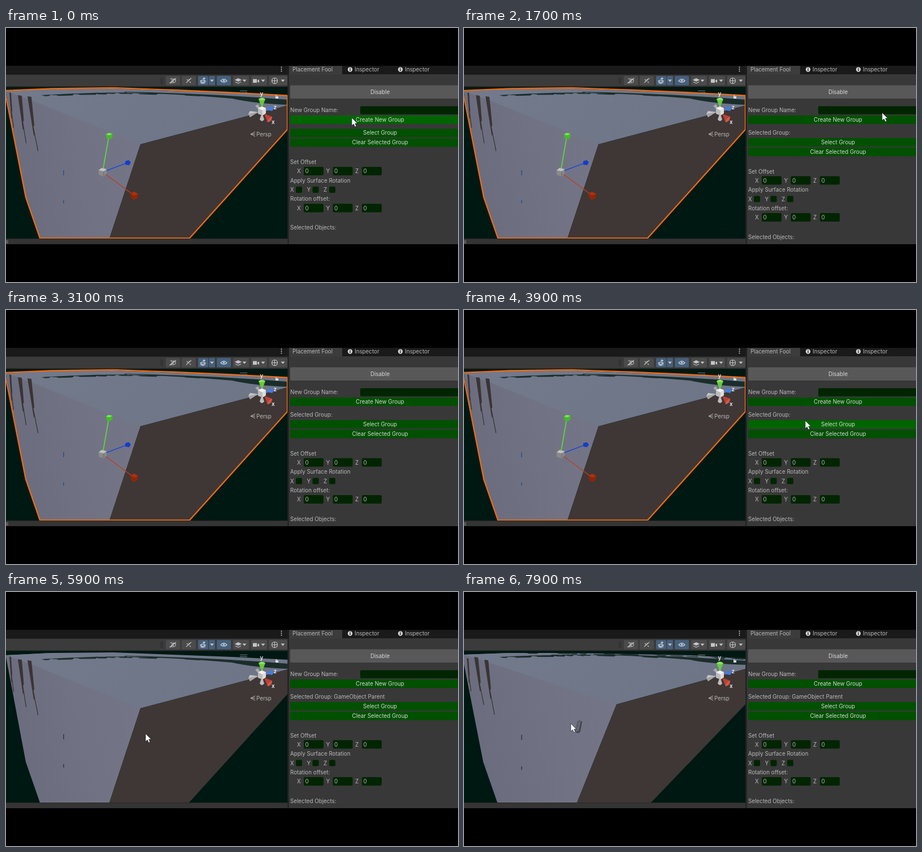
Write an HTML page that moves like this. It is 800 by 450 pixels and loops after 8 s.

```html
<!DOCTYPE html>
<html lang="en">
<head>
<meta charset="utf-8">
<title>Placement editor</title>
<style>
  html, body { margin: 0; width: 100%; height: 100%; overflow: hidden; background: #000; }
  svg { display: block; width: 800px; height: 450px; }
  text { font: 9.8px Inter, Roboto, sans-serif; fill: #b8b8b8; }
  .mid { text-anchor: middle; fill: #d8d8d8; }
  .btn { fill: #005000; }
  .btn.hot { fill: #006400; }
  .field { fill: #002500; }
  .axis { font-weight: 600; fill: #eee; }
  .icon { fill: none; stroke: #c4c4c4; stroke-width: 1.1; }
  .fill { fill: #c4c4c4; }
</style>
</head>
<body>
<svg viewBox="0 0 800 450">
  <defs>
    <clipPath id="view"><rect y="104" width="498.5" height="269"/></clipPath>
    <clipPath id="app"><rect y="67" width="800" height="316"/></clipPath>
    <linearGradient id="side" x1="0" y1=".25" x2="1" y2="0">
      <stop offset="0" stop-color="#6b6d7e"/><stop offset=".5" stop-color="#717384"/><stop offset="1" stop-color="#747688"/>
    </linearGradient>
    <linearGradient id="roof" x1="0" y1="0" x2="1" y2=".2">
      <stop offset="0" stop-color="#737a8c"/><stop offset="1" stop-color="#6d7587"/>
    </linearGradient>
  </defs>
  <rect width="800" height="450"/>
  <g clip-path="url(#app)">
    <rect y="67" width="800" height="316" fill="#383838"/>

    <!-- scene -->
    <g clip-path="url(#view)">
      <rect y="104" width="499" height="270" fill="#001812"/>
      <path id="left" fill="url(#side)"/>
      <path id="top" fill="url(#roof)"/>
      <path id="dark" fill="#3e3736"/>
      <path id="streaks" fill="#1b2d2a"/>
      <path id="slits" fill="#3a3434"/>
      <path id="marks" fill="none" stroke-width="2"/>
      <g id="capsule">
        <path d="M-3 8 1-7" stroke="#565865" stroke-width="7" stroke-linecap="round"/>
        <path d="M-3 7 2-7" stroke="#646673" stroke-width="4" stroke-linecap="round"/>
        <path d="M-4 10Q0 12 2 8L5-9" fill="none" stroke="#3c3d48" stroke-width="2"/>
      </g>
      <g id="selection">
        <path d="M-2 111 80 107.500 190 106 300 110 400 114.500 498 119.500V180L325 372.300H60L35 300-2 112" fill="none" stroke="#ee6a12" stroke-width="2.300"/>
        <path d="M172 249 182 192" stroke="#62d63a" stroke-width="1.700"/>
        <path d="M177 253 214 239" stroke="#2148d8" stroke-width="1.500"/>
        <path d="M176 259 226 296" stroke="#c23c22" stroke-width="1.500"/>
        <path d="M177 189 181 186 188 187 189 192 185 197 178 196Z" fill="#46b82c"/>
        <path d="M177 189 181 186 188 187 184 190Z" fill="#7aeb58"/>
        <path d="M211 236 217 234 221 238 218 243 211 242Z" fill="#183cc8"/>
        <path d="M220 293 227 290 234 294 233 302 226 305 221 300Z" fill="#8c260a"/>
        <path d="M220 293 227 290 234 294 227 297Z" fill="#a8330f"/>
        <path d="M164 252 169 248 178 250 178 258 173 263 164 260Z" fill="#898989"/>
        <path d="M164 252 169 248 178 250 173 254Z" fill="#c2c2c2"/>
        <path d="M173 254V262" stroke="#666"/>
      </g>

      <!-- orientation widget -->
      <path d="M414 111.500H427M414 114.500H427" stroke="#777b82"/>
      <path d="M441 138 446 135 450 142 447 144Z" fill="#aaa"/>
      <path d="M429 152 432 147 446 149 432 158Z" fill="#c6c6c6"/>
      <path d="M429 152 432 158 446 149Z" fill="#a4a4a4"/>
      <path d="M453 150 457 162Q453 168 449 162Z" fill="#bdbdbd"/>
      <path d="M447 126Q453 121 459 126L454 139H452Z" fill="#68c83c"/>
      <path d="M447 126Q453 121 459 126 453 130 447 126" fill="#8be45e"/>
      <path d="M460 145 470 138Q476 142 471 147Z" fill="#447be0"/>
      <path d="M457 152 471 157Q471 165 463 167Z" fill="#bd4034"/>
      <path d="M471 157Q471 165 463 167 463 160 471 157" fill="#d65748"/>
      <path d="M446 142 453 139 460 142V151L454 155 446 152Z" fill="#bcbcbc"/>
      <path d="M446 142 453 139 460 142 454 146Z" fill="#f1f1f1"/>
      <path d="M454 146 460 142V151L454 155Z" fill="#ddd"/>
      <text class="axis" x="449.500" y="120">y</text>
      <text class="axis" x="473.500" y="143.500">z</text>
      <text class="axis" x="470" y="170">x</text>
      <rect x="477" y="121" width="5" height="4" fill="#ddd"/>
      <path d="M477.500 121V119.500H480" fill="none" stroke="#ccc"/>
      <path d="M441 184 433 188 441 192M433 188H441" fill="none" stroke="#bbb"/>
      <text x="443" y="191.500">Persp</text>
    </g>

    <!-- toolbar -->
    <rect y="67" width="499" height="15.500" fill="#1a1a1a"/>
    <rect y="82.500" width="499" height="21.500" fill="#3b3b3b"/>
    <path d="M0 82.500H499M0 104H499" stroke="#222"/>
    <g fill="#d0d0d0"><circle cx="487.500" cy="69.500" r="1"/><circle cx="487.500" cy="73" r="1"/><circle cx="487.500" cy="76.500" r="1"/></g>
    <path d="M274.500 88V99M277 88V99" stroke="#292929"/>
    <g id="tools"></g>
    <g class="icon">
      <path d="M290.500 90H294Q295 94 290.500 97H295M296 90V97Q301 97 300 92 299 90 296 90M290 98 301 89"/>
      <path d="M319 97 328 89M320 91 323 94M325 95 327 97M324 90V92"/>
      <path d="M344 94 348 92 353 94 348 96.500ZM344 96.500 348 98.500 353 96.500M350.500 87.500V92M348 89.500H353" stroke="#e0e0e0"/>
      <path d="M380 93.500Q385.500 87.500 391 93.500 385.500 99 380 93.500Z" stroke="#dce4ec"/>
      <path d="M406 92 411 89.500 416 92 411 94.500ZM406 95.500 411 98 416 95.500"/>
      <circle cx="475.500" cy="93.500" r="5"/><path d="M470.500 93.500H480.500M475.500 88.500V98.500"/>
    </g>
    <g class="fill">
      <circle cx="385.500" cy="93.300" r="1.800"/>
      <path d="M406 92 411 89.500 416 92 411 94.500ZM437 90.500H444V97H437ZM445 93 448 91V97L445 95Z"/>
      <path id="carets"/>
    </g>
    <rect y="373" width="499" height="10" fill="#343434"/>
    <path d="M0 373.500H499" stroke="#292929"/>
    <rect id="scroll" y="376" width="4" height="6" fill="#555"/>
    <rect x="498.500" y="67" width="2" height="316" fill="#202020"/>

    <!-- panel -->
    <rect x="500" y="67" width="300" height="15" fill="#1a1a1a"/>
    <rect x="501" y="67" width="94" height="15.500" fill="#3c3c3c"/>
    <text x="507" y="77">Placement Fool</text>
    <g id="tabs"></g>
    <rect x="503" y="101.500" width="318" height="23.500" rx="2" fill="#585858"/>
    <text class="mid" x="662" y="116.600">Disable</text>
    <text x="503" y="149">New Group Name:</text>
    <rect class="field" x="627" y="138.500" width="190" height="14.500" rx="2"/>
    <rect class="btn" x="503" y="155" width="318" height="15" rx="2"/>
    <text class="mid" x="662" y="166">Create New Group</text>
    <text id="group" x="503" y="188.700"></text>
    <g id="form">
      <rect class="btn" x="503" y="195" width="318" height="15" rx="2"/>
      <text class="mid" x="662" y="205.700">Select Group</text>
      <rect class="btn" x="503" y="212" width="318" height="15" rx="2"/>
      <text class="mid" x="662" y="222.700">Clear Selected Group</text>
      <text x="503" y="257.500">Set Offset</text>
      <text x="503" y="290.200">Apply Surface Rotation</text>
      <text x="503" y="322.800">Rotation offset:</text>
      <text x="503" y="373.500">Selected Objects:</text>
      <g id="inputs"></g>
    </g>
    <path id="cursor" d="M0 0V14L3.300 11 5.500 16 8 15 5.800 10H10Z" fill="#fff" stroke="#222" stroke-width=".7"/>
  </g>
</svg>
<script>
const LOOP = 8000, STEP = 100;
const $ = id => document.getElementById(id);
const set = (id, name, value) => $(id).setAttribute(name, value);
const show = (id, on) => { $(id).style.display = on ? '' : 'none'; };
const mix = (a, b, k) => a + (b - a) * k;

// cursor path: time, x, y
const path = [
  [0, 612, 159], [500, 622, 161], [900, 634, 161], [1300, 650, 164], [1700, 740, 150],
  [1900, 830, 130], [3300, 830, 250], [3600, 680, 215], [3900, 604, 196], [4300, 606, 199],
  [4600, 700, 250], [4800, 830, 300], [5200, 830, 290], [5500, 650, 275], [5900, 247, 251],
  [6300, 205, 268], [6800, 174, 241], [7300, 178, 237], [7900, 189, 233], [8000, 189, 233]
];
const SHIFT = 500, PICK = 4200, DESELECT = 5200, PLACE = 6800, ORBIT = 7300;

function buildStatic() {
  $('tools').innerHTML = [[283, 25], [311, 25], [340, 18, 1], [359, 11, 1], [373, 25, 1], [402, 28], [434, 28], [466, 32]]
    .map(([x, w, on]) => `<rect x="${x}" y="85" width="${w}" height="16.500" rx="1.500" fill="${on ? '#46607c' : '#4b4b4b'}"/>`).join('');
  set('carets', 'd', [364.5, 422, 455, 490].map(x => `M${x - 3.5} 91.500h7l-3.500 4z`).join(''));
  $('tabs').innerHTML = [609, 698].map(x =>
    `<circle cx="${x}" cy="73.500" r="4.200" fill="#d0d0d0"/><path d="M${x} 72.700v3.300M${x} 70.700v1.200" stroke="#1a1a1a" stroke-width="1.400"/><text x="${x + 8}" y="77">Inspector</text>`).join('');
  const row = y => [526, 577.5, 629].map((x, i) =>
    `<text x="${x - 11}" y="${y + 11.3}">${'XYZ'[i]}</text><rect class="field" x="${x + 1}" y="${y}" width="35" height="15" rx="2"/><text x="${x + 3.5}" y="${y + 11.3}">0</text>`).join('');
  const checks = [503, 532.5, 562].map((x, i) =>
    `<text x="${x}" y="306.500">${'XYZ'[i]}</text><rect class="field" x="${x + 10}" y="297.500" width="11" height="11" rx="2"/>`).join('');
  $('inputs').innerHTML = row(262.5) + checks + row(328);
}

function seeded(seed) {
  return () => (seed = seed * 16807 % 2147483647) / 2147483647;
}

// overlapping torn flakes along a bowed line
function flakes(seed, x0, y0, x1, y1, bow, thick, gap) {
  const rnd = seeded(seed);
  const at = x => {
    const u = (x - x0) / (x1 - x0);
    return mix(y0, y1, u) + bow * 4 * u * (1 - u);
  };
  let d = '';
  for (let x = x0; x < x1;) {
    const w = 14 + rnd() * 28, h = thick * (.5 + rnd() * .6), end = Math.min(x1, x + w * 1.25);
    if (rnd() > gap) d += `M${x} ${at(x)}L${end} ${at(end)}l-4 ${h}L${x + w * .45} ${at(x + w * .45) + h * .8}l-2 -1Z`;
    x += w;
  }
  return d;
}

// tapering gap with ragged lower end
function slit(x, y, dx, h, w) {
  return `M${x} ${y}l${w} 1 ${dx * .3} ${h * .5} ${-w * .2} 2 ${dx * .5} ${h * .42} -1 2 ${-dx * .35} ${-h * .3} -1 3Z`;
}

function drawScene(k, selected) {
  const p = (a, b) => mix(a, b, k);
  const cx = p(238, 270), cy = p(206, 199);
  const foot = p(183, 200), end = p(324, 331), edge = p(180, 198);
  set('left', 'd', `M0 ${p(112, 111)}L80 108 150 112 ${cx} ${cy} ${foot} 373H${p(60, 59)}L${p(35, 34)} 301 0 ${p(115, 128)}Z`);
  set('top', 'd', `M0 ${p(112, 111)}L80 108 190 ${p(107, 108)} 400 ${p(115, 112)} 499 ${p(120, 118)}V${p(137, 136)}L${cx} ${cy} ${p(40, 38)} ${p(126, 123)}Z`);
  set('dark', 'd', `M${cx} ${cy}L499 ${p(137, 136)}V${edge}L${end} 373H${foot}Z`);
  const wedge = `M${p(210, 230)} ${p(113, 110)}Q${p(360, 370)} ${p(116, 112)} 499 ${p(127, 122)}V${p(136, 129)}Q${p(440, 430)} ${p(134, 127)} 400 ${p(125, 120)} 330 ${p(118, 114)} ${p(210, 230)} ${p(114, 111)}Z`;
  set('streaks', 'd', wedge
    + flakes(41, 62, p(119, 115), 215, p(114, 111), -1, 3.5, .1)
    + flakes(77, 150, p(115, 111), 400, p(121, 117), -2, 3, .15)
    + flakes(93, 8, p(114, 111), 80, p(116, 110), -1, 1.8, .4)
    + (k ? flakes(53, 90, 108, 498, 118, -3, 2.5 * k, .3) : ''));
  set('slits', 'd', slit(p(6, 5), p(114, 117), 7, p(64, 60), 3)
    + slit(p(21, 18), p(119, 115), p(12, 15), 88, 7)
    + slit(p(38, 36), p(121, 120), p(17, 16), 101, 7));
  const y1 = p(252, 253), y2 = p(305, 309);
  set('marks', 'd', `M102 ${y1}v9M102 ${y2}v6`);
  set('marks', 'stroke', selected ? '#3b5688' : '#41434e');
  set('capsule', 'transform', `translate(${p(186, 203)} ${p(241, 238)})`);
}

function cursorAt(t) {
  const i = path.findIndex((q, n) => n && q[0] >= t);
  const a = path[i - 1], b = path[i], k = (t - a[0]) / (b[0] - a[0]);
  return [mix(a[1], b[1], k), mix(a[2], b[2], k)];
}

function draw(t) {
  const selected = t < DESELECT, listed = t >= SHIFT;
  const shift = listed ? 0 : -16.4;
  const [x, y] = cursorAt(t);
  const u = Math.min(1, Math.max(0, (t - ORBIT) / 600));
  drawScene(u * u * (3 - 2 * u), selected);
  show('selection', selected);
  show('scroll', selected);
  show('capsule', t >= PLACE);
  $('group').textContent = listed ? 'Selected Group:' + (t >= PICK ? ' GameObject Parent' : '') : '';
  set('form', 'transform', `translate(0 ${shift})`);
  set('cursor', 'transform', `translate(${x} ${y})`);
  document.querySelectorAll('.btn').forEach((b, i) => {
    const top = +b.getAttribute('y') + (i ? shift : 0);
    b.classList.toggle('hot', x > 503 && x < 800 && y >= top && y < top + 15);
  });
}

let last = -1;
function tick() {
  const t = Math.floor(performance.now() % LOOP / STEP) * STEP;
  if (t !== last) draw(last = t);
  requestAnimationFrame(tick);
}
buildStatic();
tick();
</script>
</body>
</html>
```
